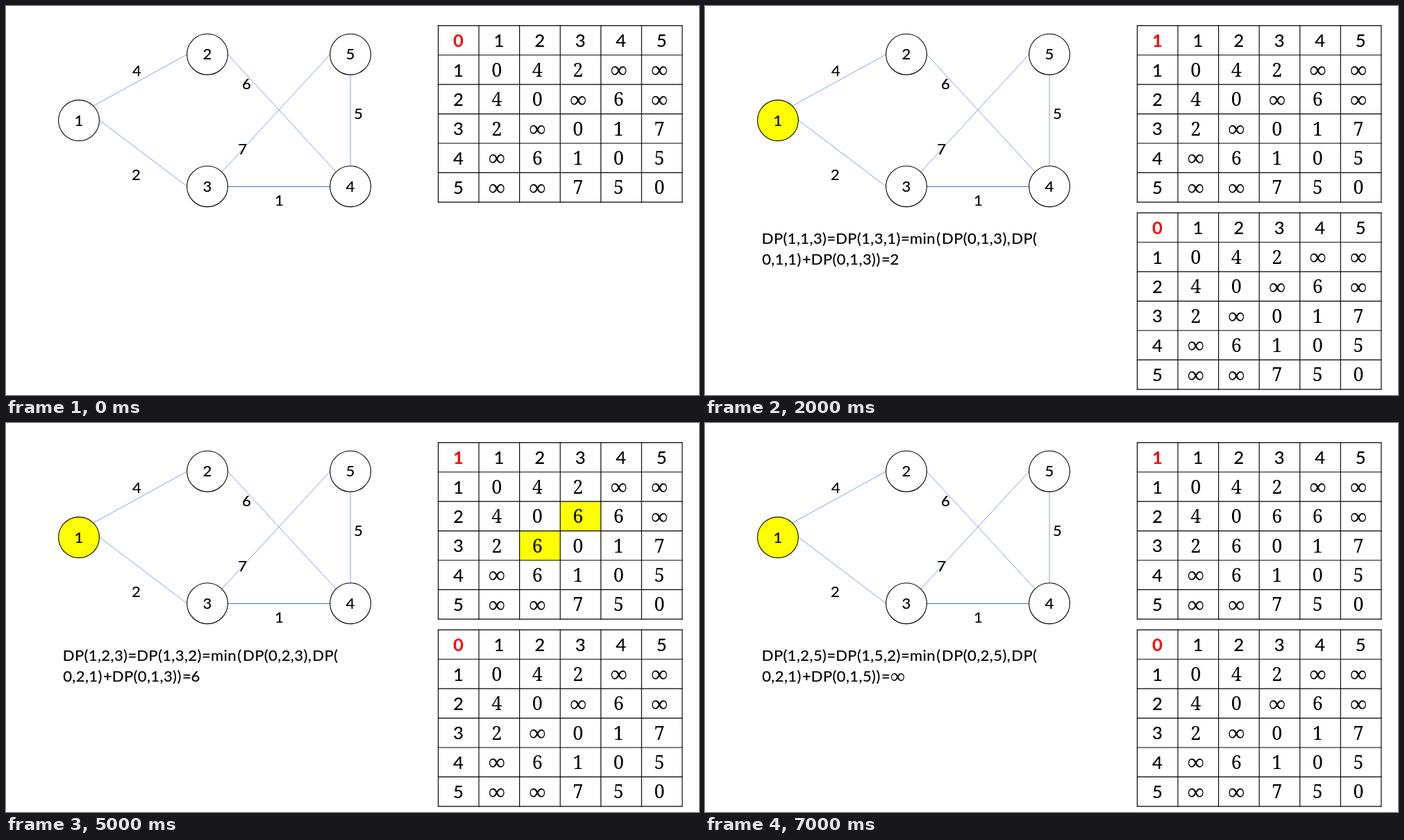
Animation, 998 px wide and 561 px high, one loop 8000 ms. Source, as an HTML page:

```html
<!DOCTYPE html>
<html lang="en">
<head>
<meta charset="utf-8">
<title>Shortest paths between all nodes</title>
<style>
  html, body { margin: 0; width: 100%; height: 100%; overflow: hidden; background: #fff; }
  svg { display: block; width: 100%; height: 100%; }
  text { font-family: Lato, sans-serif; font-size: 22px; font-kerning: none; }
  .plain { stroke: #000; stroke-width: .2px; }
  .mid { text-anchor: middle; }
  .head { font-size: 25.6px; }
  .round { font-weight: bold; fill: #f00; }
  .num { font-family: "Noto Serif", serif; font-size: 26.8px; }
  .formula { letter-spacing: .4px; }
</style>
</head>
<body>
<svg id="stage" viewBox="0 0 998 561"></svg>
<script>
const STEP = 1000;
const INF = "∞";
const YELLOW = "#ff0";
const stage = document.getElementById("stage");

const weights = [
  [0, 4, 2, INF, INF],
  [4, 0, INF, 6, INF],
  [2, INF, 0, 1, 7],
  [INF, 6, 1, 0, 5],
  [INF, INF, 7, 5, 0]
];

// row, column, resulting distance; the first step shows the bare graph
const steps = [
  null,
  [1, 2, 4], [1, 3, 2], [1, 4, INF], [1, 5, INF],
  [2, 3, 6], [2, 4, 6], [2, 5, INF]
];

const nodes = [[105, 165], [290, 69.7], [290, 260.2], [496, 260.2], [496, 69.7]];

const edges = [
  [126, 144, 260.5, 70], [135, 165, 260.5, 260],
  [319.5, 70, 475, 239], [466.5, 70, 311, 239],
  [496, 99, 496, 231], [319.5, 260.5, 466.5, 260.5]
];

const labels = [
  [4, 188.5, 93], [2, 187.5, 243.5], [6, 346.3, 112],
  [7, 340.6, 206], [5, 507.3, 155], [1, 393.5, 280]
];

const text = (s, x, y, cls) => `<text x="${x}" y="${y}" class="${cls}">${s}</text>`;

const line = (x1, y1, x2, y2, color, width) =>
  `<path d="M${x1} ${y1}L${x2} ${y2}" stroke="${color}" stroke-width="${width}"/>`;

// Outline of the infinity sign at 100px, used to centre it on its ink
const inkFont = '"Liberation Serif", serif';
const pen = document.createElement("canvas").getContext("2d");
pen.font = "100px " + inkFont;
const ink = pen.measureText(INF);
const inkWidth = ink.actualBoundingBoxLeft + ink.actualBoundingBoxRight;

function infinity(cx, cy, width) {
  const k = width / inkWidth;
  const x = cx - (ink.actualBoundingBoxRight - ink.actualBoundingBoxLeft) / 2 * k;
  const y = cy + (ink.actualBoundingBoxAscent - ink.actualBoundingBoxDescent) / 2 * k;
  return `<text x="${x}" y="${y}" style='font: ${100 * k}px ${inkFont}'>${INF}</text>`;
}

function graph(active) {
  let out = edges.map((e, i) => line(...e, "#4472c4", i === 5 ? 1 : .65)).join("");
  nodes.forEach(([x, y], i) => {
    const fill = i + 1 === active ? YELLOW : "#fff";
    out += `<circle cx="${x}" cy="${y}" r="29.4" fill="${fill}" stroke="#000" stroke-width="1.1"/>`;
    out += text(i + 1, x, y + 7.7, "plain mid");
  });
  return out + labels.map(([s, x, y]) => text(s, x, y + 7.5, "plain mid")).join("");
}

function table(top, round, data, marked) {
  const colX = c => 622.45 + 58.57 * c;
  const rowY = r => top + 42.417 * r;
  let fills = "", rules = "", words = "";
  for (let i = 0; i < 7; i++) {
    rules += line(colX(i), rowY(0) - .6, colX(i), rowY(6) + .6, "#000", 1.15);
    rules += line(colX(0) - .6, rowY(i), colX(6) + .6, rowY(i), "#000", 1.15);
  }
  for (let r = 0; r < 6; r++) {
    for (let c = 0; c < 6; c++) {
      const x = colX(c) + 29;
      const y = rowY(r);
      if (!r || !c) {
        words += text(r + c || round, x, y + 30.9, r + c ? "plain mid head" : "mid head round");
        continue;
      }
      if (marked(r, c)) {
        fills += `<rect x="${colX(c)}" y="${y}" width="58.57" height="42.417" fill="${YELLOW}"/>`;
      }
      const v = data(r, c);
      words += v === INF ? infinity(x - 3.2, y + 22.6, 22) : text(v, x - 3.4, y + 31, "mid num");
    }
  }
  return fills + rules + words;
}

function formula([i, j, result]) {
  const row = (parts, y) => parts.map(([s, x]) => text(s, x, y, "plain formula")).join("");
  const first = [
    [`DP(1,${i},${j})`, 81.8], ["=", 175.5], [`DP(1,${j},${i})`, 188.2], ["=", 281.9],
    ["min", 295], ["(", 333.2], [`DP(0,${i},${j})`, 341.1], [",", 434.8], ["DP(", 441.3]
  ];
  const second = [
    [`0,${i},1)`, 82.2], ["+", 139.9], [`DP(0,1,${j})`, 152.8], [")", 246.5], ["=", 254]
  ];
  if (result !== INF) second.push([result, 266.6]);
  return row(first, 342.8) + row(second, 372.7) +
    (result === INF ? infinity(277.5, 366.3, 19.2) : "");
}

function scene(n) {
  const step = steps[n];
  const base = (r, c) => weights[r - 1][c - 1];
  const found = (r, c) => n >= 5 && r + c === 5 && r > 1 && c > 1;
  const none = () => false;
  const current = (r, c) => found(r, c) ? 6 : base(r, c);
  let out = graph(step ? 1 : 0);
  out += table(28.3, step ? 1 : 0, current, n === 5 ? found : none);
  if (step) out += table(298.3, 0, base, none) + formula(step);
  return out;
}

let shown = -1;
function draw(now) {
  const n = Math.floor(now / STEP) % steps.length;
  if (n !== shown) {
    stage.innerHTML = scene(n);
    shown = n;
  }
}

function tick() {
  draw(performance.now());
  requestAnimationFrame(tick);
}
tick();
</script>
</body>
</html>
```
